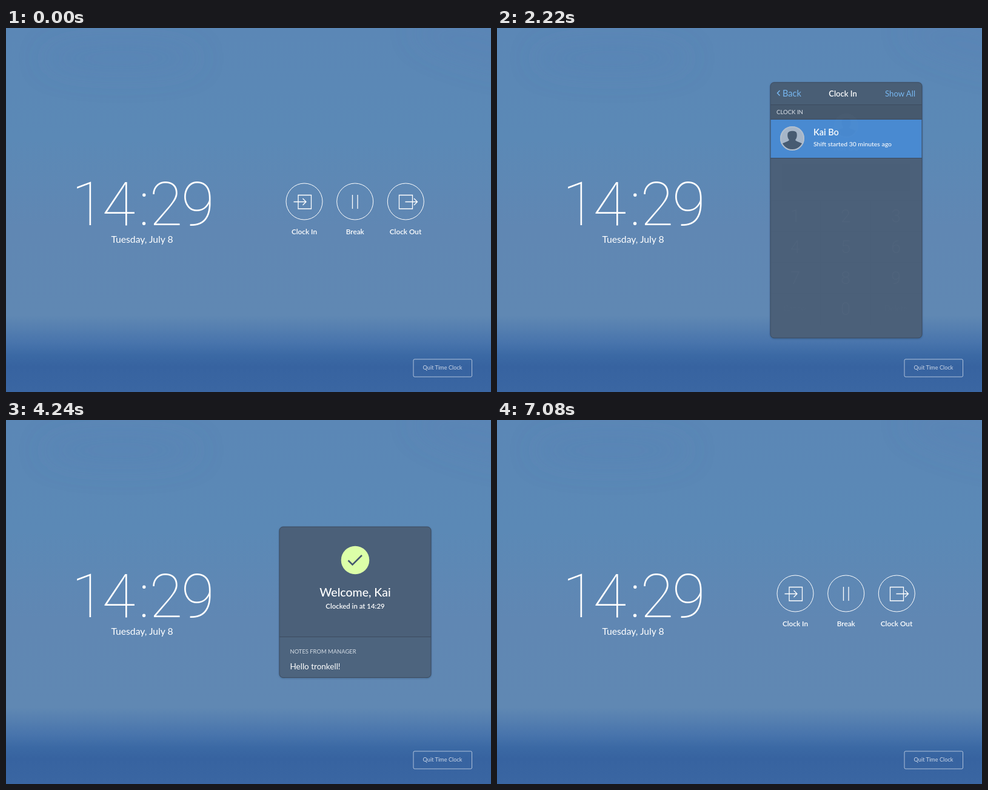
Recreate the animation shown at these times as an HTML page. Size 800x600 px, loop 7100 ms.

```html
<!DOCTYPE html>
<html lang="en">
<head>
<meta charset="utf-8">
<title>Time clock</title>
<style>
html, body { margin: 0; width: 100%; height: 100%; overflow: hidden; background: #5b89b6; }
svg { display: block; width: 800px; height: 600px; font-family: Lato, "Open Sans", sans-serif; fill: #fff; }
.mid { text-anchor: middle; }
.end { text-anchor: end; }
.med { font-weight: 500; }
.semi { font-weight: 600; }
.thin { font-family: Roboto, sans-serif; font-weight: 100; }
.key { font-family: Roboto, sans-serif; font-weight: 300; font-size: 29px; text-anchor: middle; }
.icon { fill: none; stroke: #fff; stroke-width: 1.3; }
.rule { fill: none; stroke: #3d4b5f; stroke-width: 1; }
</style>
</head>
<body>
<svg viewBox="0 0 800 600">
  <defs>
    <linearGradient id="sky" x1="0" y1="0" x2="0" y2="1">
      <stop offset="0" stop-color="#5b87b6"/>
      <stop offset=".3" stop-color="#5b89b6"/>
      <stop offset=".55" stop-color="#6087b3"/>
      <stop offset=".79" stop-color="#6088b3"/>
      <stop offset=".825" stop-color="#557fb0"/>
      <stop offset=".865" stop-color="#4874ac"/>
      <stop offset=".9" stop-color="#3b69a4"/>
      <stop offset=".93" stop-color="#3763a0"/>
      <stop offset="1" stop-color="#3a66a2"/>
    </linearGradient>
    <filter id="soft" x="-50%" y="-100%" width="200%" height="300%"><feGaussianBlur stdDeviation="24"/></filter>
    <filter id="drop" x="-10%" y="-10%" width="120%" height="120%">
      <feDropShadow dx="0" dy="1" stdDeviation="1.5" flood-color="#1c2b44" flood-opacity=".45"/>
    </filter>
    <clipPath id="clip"><rect id="clipBox" x="451" width="250" rx="6"/></clipPath>
    <g id="avatar">
      <circle r="20" fill="#a9b8cb"/>
      <path fill="#485b73" d="M-17.5 9.5C-14 6-7 6-5 2.5C-8-1-8-5-7.5-8C-7-13 7-14 7.5-8C8-5 8-1 5 2.5C7 6 14 6 17.5 9.5A20 20 0 0 1-17.5 9.5Z"/>
      <circle r="19" fill="none" stroke="#b4c1d2" stroke-width="2"/>
    </g>
  </defs>

  <rect width="800" height="600" fill="url(#sky)"/>
  <g filter="url(#soft)">
    <ellipse cx="190" cy="50" rx="130" ry="24" fill="#5379b3" opacity=".2"/>
    <ellipse cx="780" cy="30" rx="110" ry="25" fill="#5c7fb3" opacity=".2" transform="rotate(15 780 30)"/>
  </g>

  <text class="thin" font-size="100" y="325" x="108 158.5 219 236.5 289">14:29</text>
  <text class="mid" font-size="15.7" x="224.5" y="354">Tuesday, July 8</text>
  <rect x="672" y="546" width="96.5" height="29" rx="2" fill="none" stroke="#fff" stroke-opacity=".6"/>
  <text class="mid" font-size="9.2" x="720" y="563" opacity=".75">Quit Time Clock</text>

  <g id="home">
    <circle id="tap" cx="492" cy="286" r="30" fill="#4a8bd4"/>
    <g class="icon">
      <g stroke-width="1">
        <circle cx="492" cy="286" r="30"/><circle cx="575.7" cy="286" r="30"/><circle cx="659.3" cy="286" r="30"/>
      </g>
      <path d="M482 275.5H503.5V298H482ZM474.5 286.5H495M489.5 281L495 286.5L489.5 292"/>
      <path d="M571.5 275V298M580 275V298"/>
      <path d="M648.5 275.5H670.5V298H648.5ZM658.5 286.5H678.5M673 281L678.5 286.5L673 292"/>
    </g>
    <g class="mid semi" font-size="11.8">
      <text x="492" y="340">Clock In</text><text x="575.7" y="340">Break</text><text x="659" y="340">Clock Out</text>
    </g>
  </g>

  <g id="main">
    <g id="card">
      <rect id="box" x="451" width="250" rx="6" fill="#4c6179" filter="url(#drop)"/>
      <g clip-path="url(#clip)">
        <g id="list">
          <rect x="451" y="89" width="250" height="38" fill="#4a5e76"/>
          <rect x="451" y="127" width="250" height="24" fill="#47596f"/>
          <rect x="451" y="151" width="250" height="64" fill="#4f6784"/>
          <rect id="row" x="451" y="151" width="250" height="64" fill="#4a8bd4"/>
          <path class="rule" d="M451 126.5H701M451 150.5H701M451 214.5H701"/>
          <g fill="#79baf4" font-size="14.5">
            <path d="M466.5 103L462.5 107.3L466.5 111.6" fill="none" stroke="#79baf4" stroke-width="1.5"/>
            <text x="471" y="112.5">Back</text>
            <text class="end" x="690" y="112.5" font-size="13.2">Show All</text>
          </g>
          <text class="mid semi" font-size="13" x="570.5" y="112.5">Clock In</text>
          <text font-size="9.6" x="461" y="142" fill="#e1e7ee">CLOCK IN</text>
          <use href="#avatar" x="487" y="182"/>
          <text class="semi" font-size="14.5" x="522" y="177">Kai Bo</text>
          <text class="med" font-size="10.4" x="522" y="195">Shift started 30 minutes ago</text>
        </g>
        <g id="pin">
          <use href="#avatar" x="576" y="161"/>
          <text class="mid semi" font-size="14.5" x="576" y="201.5">Kai Bo</text>
          <rect x="470.5" y="224" width="211" height="44.5" rx="2" fill="#344254"/>
          <g id="dots" fill="#8fa4c0"></g>
          <rect x="451" y="285" width="250" height="204" fill="#4e647f"/>
          <rect id="zero" x="534" y="438" width="82.5" height="51" fill="#4a8bd4"/>
          <path class="rule" d="M451 284.5H701M451 335.5H701M451 386.5H701M451 437.5H701M533.5 284V489M616.5 284V489"/>
          <g id="keys"></g>
          <g class="mid" font-size="13.2" fill="#9dabbd">
            <text x="492" y="467">Cancel</text><text x="658" y="467">Delete</text>
          </g>
        </g>
        <g id="done">
          <rect x="451" y="358" width="250" height="67" fill="#4d647e"/>
          <path class="rule" d="M451 357.5H701"/>
          <circle cx="576" cy="231" r="23.3" fill="#dcffa8"/>
          <path d="M564.5 231.5L571.5 238.5L587 223" fill="none" stroke="#46596f" stroke-width="2.6"/>
          <g class="mid">
            <g id="hello">
              <text class="med" font-size="19.5" x="576" y="291">Welcome, Kai</text>
              <text class="semi" font-size="11.4" x="576" y="311">Clocked in at 14:29</text>
            </g>
            <g id="dismiss">
              <text class="med" font-size="18.6" x="576" y="291">Tap to dismiss</text>
              <g class="semi" font-size="11.4">
                <text id="ten" x="576" y="311">in 10 seconds</text>
                <text id="nine" x="576" y="311">in 9 seconds</text>
              </g>
            </g>
          </g>
          <text font-size="9.4" x="468.5" y="385" fill="#d3dbe4">NOTES FROM MANAGER</text>
          <text font-size="13.5" x="468.5" y="411">Hello tronkell!</text>
        </g>
      </g>
      <rect id="edge" class="rule" x="451" width="250" rx="6"/>
    </g>
  </g>
  <use id="echo" href="#card"/>
</svg>
<script>
const LOOP = 7100, STEP = 20;
const $ = id => document.getElementById(id);
const ramp = (t, from, to) => Math.min(1, Math.max(0, (t - from) / (to - from)));
const easeOut = p => 1 - (1 - p) ** 3;
const easeBoth = p => p * p * (3 - 2 * p);
const mix = (a, b, p) => a + (b - a) * p;
const fade = (id, a) => {
  $(id).setAttribute('opacity', a.toFixed(3));
  $(id).style.visibility = a > 0 ? 'visible' : 'hidden';
};

function add(parent, tag, attrs, text = '') {
  const el = document.createElementNS('http://www.w3.org/2000/svg', tag);
  for (const k in attrs) el.setAttribute(k, attrs[k]);
  el.textContent = text;
  $(parent).append(el);
  return el;
}

for (let n = 1; n <= 10; n++) {
  const col = n === 10 ? 1 : (n - 1) % 3, line = Math.floor((n - 1) / 3);
  add('keys', 'text', { class: 'key', x: 492 + col * 83, y: 320 + line * 51 }, n % 10);
}
const dots = [0, 1, 2, 3].map(() => add('dots', 'circle', { cy: 245, r: 6 }));

const PRESS = [3160, 3400, 3640, 3880];

function keyGlow(t) {
  if (t < PRESS[0]) return ramp(t, 2920, 2960);
  const i = PRESS.filter(p => p <= t).length - 1;
  const d = t - PRESS[i];
  if (d < 20) return .5;
  return d < 40 || i === 3 ? 0 : 1;
}

function setDots(n) {
  dots.forEach((dot, i) => {
    dot.setAttribute('cx', 575.7 + (i - (n - 1) / 2) * 16.5);
    dot.setAttribute('opacity', i < n ? 1 : 0);
  });
}

function pose(id, scale, alpha) {
  $(id).setAttribute('transform', `translate(576 300) scale(${scale.toFixed(4)}) translate(-576 -300)`);
  fade(id, alpha);
}

function draw(t) {
  // Home buttons
  const leave = ramp(t, 720, 960), enter = ramp(t, 6780, 7080);
  const back = t >= 6780;
  const shown = back ? easeOut(enter) : 1 - easeBoth(leave);
  $('home').setAttribute('transform', `translate(0 ${((1 - shown) * 20).toFixed(2)})`);
  fade('home', shown);
  fade('tap', back ? 0 : ramp(t, 480, 520));

  // Card contents and size
  const toPin = easeBoth(ramp(t, 2200, 2440)), toDone = easeBoth(ramp(t, 4000, 4240));
  const half = mix(mix(211, 188, toPin), 124.2, toDone);
  for (const id of ['box', 'clipBox', 'edge']) {
    $(id).setAttribute('y', 300.3 - half);
    $(id).setAttribute('height', half * 2);
  }
  fade('list', 1 - toPin);
  fade('pin', toPin * (1 - toDone));
  fade('done', toDone);
  fade('row', ramp(t, 1680, 1720));
  fade('zero', keyGlow(t));
  setDots(PRESS.filter(p => p + 20 <= t).length);

  fade('hello', 1 - ramp(t, 4720, 5020));
  fade('dismiss', ramp(t, 5080, 5400));
  const tick = ramp(t, 5880, 5920);
  fade('ten', 1 - tick);
  fade('nine', tick);

  // Card pops in, later shrinks away with a trailing echo
  const open = easeOut(ramp(t, 980, 1200));
  const out = ramp(t, 6400, 6580), late = ramp(t, 6420, 6600);
  if (out === 0) pose('main', mix(.7, 1, open), open);
  else pose('main', 1 - .684 * out, (1 - out) ** 1.3);
  pose('echo', 1 - .684 * late, out > 0 && out < 1 ? .5 * (1 - late) : 0);
}

const start = performance.now();
function frame() {
  const t = (performance.now() - start) % LOOP;
  draw(Math.floor(t / STEP) * STEP);
  requestAnimationFrame(frame);
}
frame();
</script>
</body>
</html>
```
